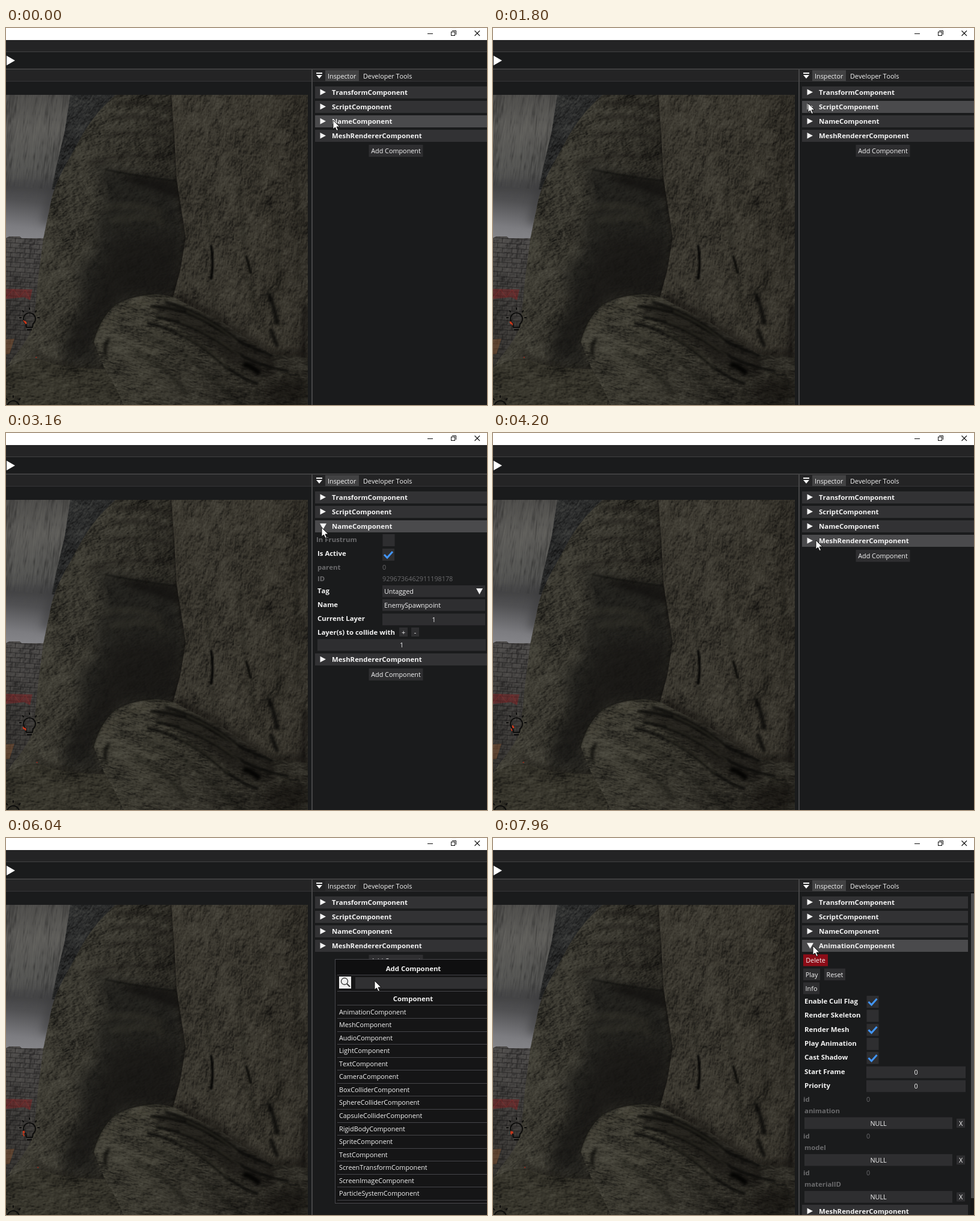
Animation, 800 px wide and 626 px high, one loop 8000 ms. Source, as an HTML page with a canvas:

```html
<!DOCTYPE html>
<html lang="en">
<head>
<meta charset="utf-8">
<title>Component inspector</title>
<style>
  html, body { margin: 0; width: 100%; height: 100%; overflow: hidden; background: #1a1b1c; }
  canvas { display: block; width: 800px; height: 626px; }
</style>
</head>
<body>
<canvas id="stage" width="800" height="626"></canvas>
<script>
const W = 800, H = 626, LOOP = 8000;
const ctx = document.getElementById('stage').getContext('2d');
const FIELD = '#2e2e30', WHITE = '#f4f4f4', GREY = '#6a6a6c';

function makeCanvas(w, h) {
  const c = document.createElement('canvas');
  c.width = w; c.height = h;
  return c;
}

function seeded(seed) {
  return () => {
    seed = (seed * 1664525 + 1013904223) >>> 0;
    return seed / 4294967296;
  };
}

// ---------- 3D viewport ----------

// Fractal noise, embossed, stored as translucent black and white
function makeTexture(size) {
  const rand = seeded(7), height = new Float32Array(size * size);
  for (const [cell, weight] of [[64, .2], [32, .2], [16, .2], [8, .19], [4, .17], [2, .12]]) {
    const n = size / cell, grid = Array.from({ length: n * n }, () => rand() * 2 - 1);
    const at = (x, y) => grid[(y % n) * n + x % n];
    for (let y = 0; y < size; y++) for (let x = 0; x < size; x++) {
      const gx = Math.floor(x / cell), gy = Math.floor(y / cell);
      let u = x / cell - gx, v = y / cell - gy;
      u *= u * (3 - 2 * u); v *= v * (3 - 2 * v);
      const top = at(gx, gy) * (1 - u) + at(gx + 1, gy) * u;
      const bottom = at(gx, gy + 1) * (1 - u) + at(gx + 1, gy + 1) * u;
      height[y * size + x] += weight * (top * (1 - v) + bottom * v);
    }
  }
  const c = makeCanvas(size, size), g = c.getContext('2d'), img = g.createImageData(size, size);
  for (let y = 0; y < size; y++) for (let x = 0; x < size; x++) {
    const i = y * size + x, j = ((y + 2) % size) * size + (x + 2) % size;
    const v = height[i] * .7 + (height[i] - height[j]) * 1.1;
    const shade = v < 0 ? 0 : 235;
    img.data.set([shade, shade, shade * .9, 255 * Math.min(.65, Math.abs(v) * (v < 0 ? .9 : .17))], i * 4);
  }
  g.putImageData(img, 0, 0);
  return c;
}

function makeScene() {
  const c = makeCanvas(502, H), g = c.getContext('2d');
  const texture = g.createPattern(makeTexture(512), 'repeat');
  const gradient = (x0, y0, x1, y1, ...stops) => {
    const grad = g.createLinearGradient(x0, y0, x1, y1);
    stops.forEach(([p, color]) => grad.addColorStop(p, color));
    return grad;
  };
  const surface = (d, fill, amount, sx = 1, sy = 1, angle = 0) => {
    const path = new Path2D(d);
    g.fillStyle = fill;
    g.fill(path);
    texture.setTransform(new DOMMatrix().rotate(angle).scale(sx, sy));
    g.globalAlpha = amount;
    g.fillStyle = texture;
    g.fill(path);
    g.globalAlpha = 1;
  };
  const soft = (d, color, blur, width) => {
    const path = new Path2D(d);
    g.filter = `blur(${blur}px)`;
    if (width) { g.strokeStyle = color; g.lineWidth = width; g.stroke(path); }
    else { g.fillStyle = color; g.fill(path); }
    g.filter = 'none';
  };
  const inside = (d, draw) => { g.save(); g.clip(new Path2D(d)); draw(); g.restore(); };

  g.beginPath(); g.rect(0, 111, 502, H - 111); g.clip();

  // fog, waterfall, cliff
  g.fillStyle = gradient(12, 255, 0, 352, [0, '#434344'], [.3, '#505052'], [.75, '#7c7c80'], [1, '#88888c']);
  g.fillRect(0, 111, 200, 260);
  surface('M0 111H107L98 170L78 268L0 262Z',
    gradient(0, 111, 0, 270, [0, '#4c4b49'], [.35, '#5c5b58'], [.75, '#545452'], [1, '#454546']), .55, .5, 4, 4);
  soft('M-10 262Q40 256 90 270', 'rgba(66,66,68,.7)', 6, 14);
  soft('M82 255L66 325', 'rgba(60,60,62,.6)', 7, 16);
  surface('M107 111H210V270L76 268L82 238L98 170Z', '#2c2d2d', 1, .6, 1, 25);

  // brick roofs
  const roof = 'M0 349L5 346H23L26 349H70V580H0Z';
  surface(roof, gradient(0, 347, 0, 560, [0, '#4d4b4a'], [.45, '#42403e'], [1, '#383633']), .6);
  inside(roof, () => {
    g.strokeStyle = 'rgba(25,24,24,.6)';
    g.lineWidth = 1;
    g.beginPath();
    for (let row = 0; row < 26; row++) {
      const y = 348 + row * 8;
      g.moveTo(0, y); g.lineTo(75, y + 5);
      for (let x = row % 2 * 8; x < 75; x += 16) { g.moveTo(x, y + x / 15); g.lineTo(x - 1, y + 8 + x / 15); }
    }
    g.stroke();
    g.fillStyle = 'rgba(120,36,37,.55)';
    g.fill(new Path2D('M0 433L44 434L40 452L30 447L0 450Z'));
    g.strokeStyle = 'rgba(150,48,48,.5)';
    g.stroke(new Path2D('M0 448L12 434L22 447L32 435L40 450'));
    g.fillStyle = 'rgba(138,86,48,.45)';
    g.fill(new Path2D('M0 517L14 516L6 541L0 542Z'));
  });

  // large rock with its shaded hollow
  const rock = 'M182 111C158 132 135 160 120 190C102 224 82 252 74 292L62 350L53 420L46 490C36 525 14 540 0 566V626H502V111Z';
  surface(rock, gradient(50, 330, 300, 390, [0, '#3f3d34'], [.25, '#3a3830'], [.6, '#312f28'], [1, '#2a2822']), 1, 1, .65, -15);
  inside(rock, () => {
    soft('M150 222Q215 246 284 254L299 346L282 446L190 455L146 520L160 564L95 558L100 505L125 462L120 400L150 370L150 320L165 280Z', 'rgba(24,23,21,.62)', 10);
    soft('M180 350L292 345L282 442L190 452L130 530L95 545L140 455Z', 'rgba(22,21,19,.55)', 12);
    soft('M185 245Q235 246 284 254L292 285Q235 268 185 245Z', 'rgba(18,17,15,.7)', 4);
    soft('M165 235Q215 246 284 254', 'rgba(12,12,10,.7)', 1.2, 2);
    soft('M175 150Q225 140 275 160M165 180Q220 168 275 185M190 125Q235 122 272 135M140 225Q190 205 275 215', 'rgba(18,17,15,.5)', 3, 5);
    soft('M160 300Q215 285 260 310M170 322Q225 305 265 325', 'rgba(72,69,56,.4)', 5, 7);
    soft('M48 540Q100 572 170 566', 'rgba(20,19,16,.55)', 4, 8);
    soft('M275 111L280 180L284 252L299 348L290 402L278 446', 'rgba(14,13,11,.6)', 2, 4);
  });
  surface('M0 566Q25 548 50 549L100 563L165 567L190 600V626H0Z', '#35332a', .9, 1.1, .7, 10);

  // upright pillar
  const pillar = 'M275 111L280 180L284 252L299 348L290 402L278 446L330 500L502 600V111Z';
  surface(pillar, gradient(275, 0, 502, 0, [0, '#38352d'], [.3, '#3a372f'], [.7, '#37342c'], [1, '#322f28']), .95, .65, 1, 4);
  inside(pillar, () => {
    soft('M341 360Q346 390 341 418', 'rgba(5,5,4,.95)', 1, 4);
    soft('M399 378Q404 392 407 408', 'rgba(8,8,6,.85)', 1.2, 4);
    soft('M436 440Q448 465 451 492M440 500L452 530', 'rgba(8,8,6,.85)', 2, 6);
    soft('M342 418L346 470M400 408L420 480M330 250L338 350M385 260L398 372M450 300L455 440M482 230L488 420', 'rgba(15,14,12,.3)', 3, 5);
    soft('M498 460L494 550', 'rgba(12,11,10,.6)', 4, 10);
    soft('M285 446L340 474L400 515L440 541H502', 'rgba(14,13,11,.5)', 5, 14);
  });

  // foreground knee
  const knee = 'M146 521C153 496 163 476 183 459Q207 446 236 443Q258 441 278 447L304 460L330 474L360 488L400 515L440 541L502 548V626H196L184 600L163 563Z';
  surface(knee, gradient(170, 460, 420, 620, [0, '#403e35'], [.35, '#3b3930'], [.7, '#302e27'], [1, '#292721']), 1, 1.2, .55, 22);
  inside(knee, () => {
    soft('M262 455Q320 462 360 488L400 515L450 550L440 580Q390 575 350 540T245 470Z', 'rgba(16,15,13,.5)', 5);
    soft('M240 462Q300 465 345 495T445 545M250 480Q310 490 360 525T470 570M235 490Q300 505 345 545T420 590M265 455Q325 472 380 515', 'rgba(8,8,7,.7)', 1.5, 5);
    soft('M300 470Q350 490 385 522M290 488Q340 505 390 545M285 505Q335 530 370 565', 'rgba(80,77,64,.35)', 1.5, 3);
    soft('M230 510Q290 530 330 570T390 620M215 540Q270 560 300 610', 'rgba(14,13,11,.4)', 3, 6);
    soft('M395 558Q410 562 422 574', 'rgba(4,4,3,.95)', 2, 9);
    soft('M172 515Q162 526 166 545', 'rgba(8,8,6,.85)', 2, 5);
    soft('M425 600Q465 575 502 585V626H440Z', 'rgba(14,13,11,.45)', 8);
    soft('M160 500Q190 462 240 452', 'rgba(100,97,80,.22)', 5, 10);
  });
  soft('M146 521C153 496 163 476 183 459Q207 446 236 443L278 447', 'rgba(15,15,12,.55)', 1, 1.5);

  bulb(g, 39, 483);
  bulb(g, 12, 629);
  return c;
}

function bulb(g, x, y) {
  g.strokeStyle = '#0d0d0c';
  g.lineWidth = 2;
  g.beginPath();
  g.arc(x, y, 10, 2.2, .94);
  g.lineTo(x + 5, y + 14); g.lineTo(x - 5, y + 14); g.closePath();
  g.moveTo(x - 4, y + 18); g.lineTo(x + 4, y + 18);
  for (let i = 0; i < 5; i++) {
    const a = Math.PI * (1 + i / 4);
    g.moveTo(x + Math.cos(a) * 13, y - 2 + Math.sin(a) * 13);
    g.lineTo(x + Math.cos(a) * 17, y - 2 + Math.sin(a) * 17);
  }
  g.stroke();
}

function drawEmbers(t) {
  const rand = seeded(Math.floor(t / 80) * 977 + 5);
  rand();
  ctx.strokeStyle = '#d23a1c';
  ctx.lineWidth = 1.6;
  ctx.beginPath();
  for (let i = 0; i < 3; i++) {
    const x = 28 + rand() * 5, y = 485 + rand() * 7;
    ctx.moveTo(x, y); ctx.lineTo(x + 3 * rand(), y + 4);
  }
  ctx.stroke();
  box(49 + rand() * 4, 546, 2, 2, '#8a2a1e');
}

// ---------- drawing helpers ----------

function box(x, y, w, h, color) { ctx.fillStyle = color; ctx.fillRect(x, y, w, h); }

function shape(color, ...points) {
  ctx.fillStyle = color;
  ctx.beginPath();
  points.forEach(([x, y]) => ctx.lineTo(x, y));
  ctx.fill();
}

function line(color, width, ...points) {
  ctx.strokeStyle = color;
  ctx.lineWidth = width;
  ctx.beginPath();
  points.forEach(([x, y]) => ctx.lineTo(x, y));
  ctx.stroke();
}

function text(str, x, y, { bold = false, color = WHITE, align = 'left' } = {}) {
  ctx.font = `${bold ? '700 11.4px' : '400 10.8px'} "Open Sans", "Noto Sans", sans-serif`;
  ctx.fontKerning = 'none';
  ctx.textAlign = align;
  ctx.fillStyle = color;
  ctx.fillText(str, x, y + 4);
}

const label = (str, y, color = WHITE, x = 518) => text(str, x, y, { bold: true, color });

function field(str, x, y, w, color = FIELD, h = 19.5) {
  box(x, y - h / 2, w, h, color);
  text(str, x + w / 2, y, { align: 'center' });
}

function checkbox(x, y, checked) {
  box(x, y - 10, 20, 20, FIELD);
  if (checked) line('#4296fa', 3, [x + 3, y], [x + 8, y + 5], [x + 17, y - 5]);
}

// ---------- inspector ----------

function nameSection() {
  label('In Frustrum', 177, GREY, 516); checkbox(626.5, 178, false);
  label('Is Active', 200); checkbox(626, 202, true);
  label('parent', 223, GREY); text('0', 626, 223, { color: GREY });
  label('ID', 242, GREY); text('9296736462911198178', 626, 242, { color: GREY });
  label('Tag', 262); box(626, 253, 171, 19.5, FIELD); text('Untagged', 629, 263);
  shape(WHITE, [782, 258], [793, 258], [787.5, 268]);
  label('Name', 285); box(626, 276, 171, 19.5, FIELD); text('EnemySpawnpoint', 629, 286);
  label('Current Layer', 308); field('1', 626, 309.5, 171);
  label('Layer(s) to collide with', 331);
  field('+', 654, 330.5, 14, FIELD, 15); field('-', 674, 330.5, 13, FIELD, 15);
  field('1', 518, 352, 280);
}

function animationSection() {
  field('Delete', 516, 203, 41, '#8c0c17');
  field('Play', 516, 226.5, 28);
  field('Reset', 551, 226.5, 35);
  field('Info', 516, 249.5, 27);
  ['Enable Cull Flag', 'Render Skeleton', 'Render Mesh', 'Play Animation', 'Cast Shadow'].forEach((name, i) => {
    label(name, 271 + i * 23.3);
    checkbox(621.5, 272 + i * 23.3, i % 2 === 0);
  });
  label('Start Frame', 387.5); field('0', 621, 389, 165);
  label('Priority', 411); field('0', 621, 412, 165);
  ['animation', 'model', 'materialID'].forEach((name, i) => {
    const y = 434 + i * 61.2;
    label('id', y, GREY, 516); text('0', 621, y, { color: GREY });
    label(name, y + 19, GREY);
    field('NULL', 518, y + 39.5, 246);
    field('X', 771, y + 39.5, 14, FIELD, 15);
  });
}

function popup() {
  box(548, 201, 260, 405, '#151516');
  box(548, 201, 260, 26, '#0f0f10');
  ctx.strokeStyle = '#48484d';
  ctx.lineWidth = 1;
  ctx.strokeRect(547.5, 201.5, 260, 405);
  text('Add Component', 677.5, 216.5, { bold: true, align: 'center' });
  for (const y of [227, 254]) box(551, y, 249, 1, '#454549');
  box(554, 230, 20, 20, '#f0f0f0');
  ctx.strokeStyle = '#333';
  ctx.lineWidth = 1.3;
  ctx.beginPath(); ctx.arc(563, 238, 5.5, 0, 7); ctx.stroke();
  line('#333', 2, [567, 242], [572, 247]);
  box(581, 231, 219, 19.5, '#303032');
  text('Component', 677, 267, { bold: true, align: 'center' });
  box(551, 277, 249, 1, '#454549');
  ['Animation', 'Mesh', 'Audio', 'Light', 'Text', 'Camera', 'BoxCollider', 'SphereCollider', 'CapsuleCollider',
    'RigidBody', 'Sprite', 'Test', 'ScreenTransform', 'ScreenImage', 'ParticleSystem'].forEach((name, i) => {
    const y = 288.5 + i * 21.57;
    text(name + 'Component', 554, y);
    box(551, Math.round(y + 10.5), 249, 1, '#454549');
  });
}

function inspector(t, mouse) {
  const popupOpen = t >= 5720 && t < 6640, added = t >= 6640, animationOpen = t >= 7400;
  const right = animationOpen ? 790 : 800;
  const rows = [['Transform'], ['Script'], ['Name', t >= 2760 && t < 3640, 197, nameSection]];
  if (added) rows.push(['Animation', animationOpen, 416.5, animationSection]);
  rows.push(['MeshRenderer']);

  box(531, 70, 56, 18, popupOpen ? '#2b2b2c' : '#424243');
  text('Inspector', 535, 80);
  text('Developer Tools', 594, 80);
  box(516, 74, 10, 2, WHITE);
  shape(WHITE, [516, 78], [526, 78], [521, 84]);

  let y = 107;
  for (const [name, open, extra, section] of rows) {
    const hover = !popupOpen && mouse.x >= 514 && Math.abs(mouse.y - y) <= 10.5;
    box(514, Math.round(y - 10.5), right - 514, 20, hover ? '#4a4a4c' : '#323234');
    if (open) shape(WHITE, [522, y - 5], [533, y - 5], [527.5, y + 4.5]);
    else shape(WHITE, [522.5, y - 5.5], [532, y - .5], [522.5, y + 4.5]);
    label(name + 'Component', y, WHITE, 542);
    if (open) { section(); y += extra; }
    y += 24.1;
  }
  field('Add Component', 603.5, y + .5, 90, FIELD, 20);
  if (animationOpen) {
    box(794, 89, 6, H - 89, '#151516');
    box(795, 92, 5, 506, '#4c4c4e');
  }
  if (popupOpen) popup();
}

// ---------- frame and pointer ----------

function windowChrome() {
  box(0, 0, W, H, '#1a1b1c');
  box(0, 0, W, 20, '#fff');
  box(0, 20, W, 19, '#242425');
  box(0, 39, W, 1, '#414142');
  box(0, 68, W, 21, '#242425');
  box(0, 67.5, W, 1.5, '#4a4a4b');
  box(0, 88, W, 1, '#343436');
  box(508, 68, 2, H - 68, '#464647');
  shape('#fff', [1, 46], [15, 54], [1, 62]);
  line('#111', 1, [701, 9.5], [710, 9.5]);
  ctx.strokeRect(740.5, 6.5, 6, 6);
  line('#111', 1, [742, 4.5], [748.5, 4.5], [748.5, 11]);
  line('#111', 1.1, [779.5, 4.5], [788, 13]);
  line('#111', 1.1, [788, 4.5], [779.5, 13]);
}

const pointerKeys = [
  [0, 544, 153], [500, 525, 101], [1350, 525, 101], [1680, 524, 125], [2480, 524, 125],
  [2680, 525, 157], [3640, 525, 157], [4120, 537, 178], [4320, 537, 178], [4480, 527, 177],
  [5000, 527, 177], [5280, 574, 196], [5600, 625, 201], [5760, 625, 201], [6040, 613, 237],
  [6480, 603, 286], [6700, 603, 286], [7240, 528, 177], [7600, 528, 177], [7900, 532, 179], [8000, 532, 179]
];

function pointerAt(t) {
  const i = pointerKeys.findIndex(key => key[0] > t);
  const [t0, x0, y0] = pointerKeys[i - 1], [t1, x1, y1] = pointerKeys[i];
  const u = (t - t0) / (t1 - t0), e = u * u * (3 - 2 * u);
  return { x: x0 + (x1 - x0) * e, y: y0 + (y1 - y0) * e };
}

function drawPointer({ x, y }) {
  const outline = [[0, 0], [0, 15], [3.5, 12], [6, 17.5], [8.5, 16.5], [6, 11], [11, 11], [0, 0]]
    .map(([dx, dy]) => [x + dx, y + dy]);
  shape('#fff', ...outline);
  line('#111', 1, ...outline);
}

const scene = makeScene();

function render(now) {
  const t = now % LOOP, mouse = pointerAt(t);
  windowChrome();
  ctx.drawImage(scene, 0, 0);
  drawEmbers(t);
  inspector(t, mouse);
  drawPointer(mouse);
  requestAnimationFrame(() => render(performance.now() - start));
}

const start = performance.now();
render(0);
</script>
</body>
</html>
```
